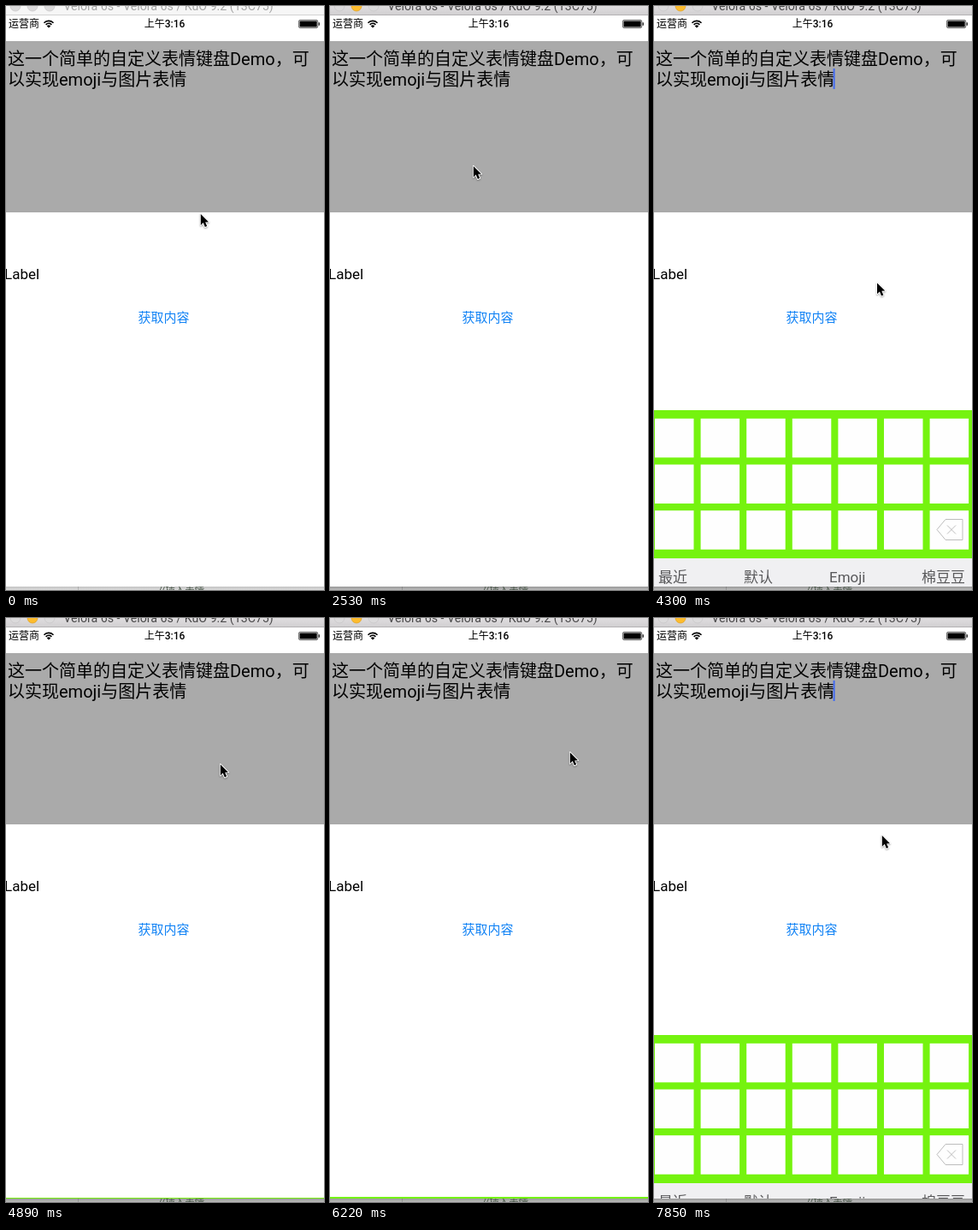
An HTML page with a canvas that plays this animation: 372 by 682 pixels, repeating every 8000 ms.

```html
<!DOCTYPE html>
<html lang="zh">
<head>
<meta charset="utf-8">
<title>自定义表情键盘</title>
<style>
html, body { margin: 0; width: 100%; height: 100%; overflow: hidden; background: #fff; }
canvas { display: block; width: 372px; height: 682px; }
</style>
</head>
<body>
<canvas id="stage"></canvas>
<script>
const W = 372, H = 682, LOOP = 8000, STEPS = 54, STEP = LOOP / STEPS;
const SCREEN_BOTTOM = 678, BOARD_H = 208, KEYS_H = 173;
const FONT = "Roboto, 'Noto Sans CJK SC', 'Noto Sans CJK', sans-serif";

const canvas = document.getElementById('stage');
const ctx = canvas.getContext('2d');
const dpr = window.devicePixelRatio || 1;
canvas.width = W * dpr;
canvas.height = H * dpr;
ctx.scale(dpr, dpr);

// Pointer stops as [ms, x, y]; each click toggles the keyboard.
const wander = [[0, 227, 242], [300, 203, 236], [1180, 186, 386], [1480, 200, 365], [2000, 168, 127], [2300, 167, 186]];
const clicks = [
  [2600, 167, 186], [3398, 280, 302], [3930, 250, 185], [4440, 261, 333], [5000, 250, 170],
  [5850, 254, 309], [6300, 280, 156], [6930, 275, 300], [7626, 266, 200]
];
const stops = [...wander, ...clicks, [7850, 266, 253]];
const ACTIVE_FROM = 2500;

const clamp = v => Math.min(1, Math.max(0, v));
const smooth = v => v * v * (3 - 2 * v);

// Between two stops the pointer rests, glides, then rests again.
function pointerAt(ms) {
  const next = stops.findIndex(s => s[0] > ms);
  if (next < 0) return stops[stops.length - 1].slice(1);
  const [t0, x0, y0] = stops[next - 1], [t1, x1, y1] = stops[next];
  const k = smooth(clamp(((ms - t0) / (t1 - t0) - 0.3) / 0.5));
  return [x0 + (x1 - x0) * k, y0 + (y1 - y0) * k];
}

// Critically damped spring, in whole pixels.
function keyboardAt(ms) {
  const past = clicks.filter(c => c[0] <= ms);
  const shown = past.length % 2 === 1;
  if (!past.length) return { shown, offset: BOARD_H };
  const s = 18.26 * (ms - past[past.length - 1][0]) / 1000;
  const rest = (1 + s) * Math.exp(-s);
  return { shown, offset: Math.round(BOARD_H * (shown ? rest : 1 - rest)) };
}

function rect(x, y, w, h, color) {
  ctx.fillStyle = color;
  ctx.fillRect(x, y, w, h);
}

function text(str, x, y, size, color, align = 'left', weight = 400) {
  ctx.font = `${weight} ${size}px ${FONT}`;
  ctx.textAlign = align;
  ctx.fillStyle = color;
  ctx.fillText(str, x, y);
}

function poly(points) {
  ctx.beginPath();
  points.forEach(([x, y]) => ctx.lineTo(x, y));
  ctx.closePath();
}

function shade(y0, y1, c0, c1) {
  const g = ctx.createLinearGradient(0, y0, 0, y1);
  g.addColorStop(0, c0);
  g.addColorStop(1, c1);
  return g;
}

function clipped(y, h, paint) {
  ctx.save();
  ctx.beginPath();
  ctx.rect(0, y, W, h);
  ctx.clip();
  paint();
  ctx.restore();
}

function drawTitleBar(active) {
  rect(0, 0, W, 10, active ? shade(0, 10, '#dfdddf', '#d2d0d2') : '#f6f6f6');
  rect(0, 10, W, 1, active ? '#b4b2b4' : '#d2d2d2');
  for (let i = 0; i < 3; i++) {
    const lit = active && i === 1;
    ctx.beginPath();
    ctx.arc(11 + i * 20, 0, 6, 0, Math.PI * 2);
    ctx.fillStyle = lit ? '#fdbc2e' : '#dbdadb';
    ctx.fill();
    ctx.lineWidth = 0.7;
    ctx.strokeStyle = lit ? '#dfa023' : '#c6c5c6';
    ctx.stroke();
  }
  text('Velora 6s - Velora 6s / KuO 9.2 (13C75)', 190, 4.6, 14.2, active ? '#4a494a' : '#a6a6a6', 'center');
}

function drawStatusBar() {
  text('运营商', 3, 25.4, 12, '#000');
  text('上午3:16', 185.6, 25.4, 12, '#000', 'center', 500);

  ctx.strokeStyle = '#000';
  ctx.lineWidth = 1.6;
  const from = -Math.PI * 0.76, to = -Math.PI * 0.24;
  for (const r of [4.6, 7.6]) {
    ctx.beginPath();
    ctx.arc(50, 25, r, from, to);
    ctx.stroke();
  }
  ctx.beginPath();
  ctx.moveTo(50, 25.5);
  ctx.arc(50, 25.5, 3, from, to);
  ctx.fill();

  ctx.lineWidth = 0.6;
  ctx.beginPath();
  ctx.roundRect(342.4, 16.4, 22.4, 9.2, 1.8);
  ctx.stroke();
  rect(343.5, 17.5, 20.2, 7, '#000');
  rect(365.6, 19.3, 1.2, 3.4, '#000');
}

function drawPage(caret) {
  rect(0, 41, W, 200, '#aaa');
  text('这一个简单的自定义表情键盘Demo，可', 2, 69, 20, '#000');
  text('以实现emoji与图片表情', 2, 92.6, 20, '#000');
  if (caret) rect(209.6, 73, 2, 24, '#426bf2');
  text('Label', -2, 319, 17, '#000');
  text('获取内容', 184.5, 368.6, 15, '#1283f5', 'center');
}

function drawDeleteKey(y) {
  ctx.strokeStyle = '#bdbdbd';
  ctx.lineWidth = 1;
  poly([[331, y], [341, y - 12], [361, y - 12], [361, y + 12], [341, y + 12]]);
  ctx.stroke();
  ctx.beginPath();
  for (const d of [-5, 5]) {
    ctx.moveTo(343, y - d);
    ctx.lineTo(353, y + d);
  }
  ctx.stroke();
}

function drawKeyboard(offset) {
  const top = SCREEN_BOTTOM - BOARD_H + offset;
  rect(0, top, W, KEYS_H, '#75f30f');
  for (let i = 0; i < 21; i++) {
    const col = i % 7, row = Math.floor(i / 7);
    rect(1 + col * 53.6, top + 9.8 + row * 53.7, 45.5, 45.5, '#fefefe');
  }
  drawDeleteKey(top + 139.5);
  rect(0, top + KEYS_H, W, BOARD_H - KEYS_H, '#f0f0f2');
  const y = top + 200.6;
  ['最近', '默认', 'Emoji'].forEach((tab, i) => text(tab, 5 + i * 100, y, 17, '#58585a'));
  text('棉豆豆', 364, y, 17, '#58585a', 'right');
}

function drawBackdrop(active) {
  const [near, far] = active ? ['#989898', '#bcbcbc'] : ['#c2c2c2', '#dcdcdc'];
  rect(0, SCREEN_BOTTOM, W, 4, shade(SCREEN_BOTTOM, H, near, far));
  rect(84, SCREEN_BOTTOM, 1, 4, 'rgba(0,0,0,.15)');
  text('//插入表情', 178, 686, 11.5, '#4d5a4d');
}

function drawPointer([x, y]) {
  ctx.save();
  ctx.translate(x + 0.8, y + 1);
  ctx.scale(0.92, 0.92);
  poly([[0, 0], [0, 14], [3.2, 11], [5.5, 16.4], [8, 15.3], [5.8, 10.2], [10, 10]]);
  ctx.lineJoin = 'round';
  ctx.lineWidth = 2;
  ctx.strokeStyle = '#fff';
  ctx.shadowColor = 'rgba(0,0,0,.35)';
  ctx.shadowBlur = 2 * dpr;
  ctx.shadowOffsetY = dpr;
  ctx.stroke();
  ctx.shadowColor = 'transparent';
  ctx.fillStyle = '#000';
  ctx.fill();
  ctx.restore();
}

function draw(now) {
  // The picture is held between evenly spaced steps.
  const ms = Math.min(STEPS - 1, Math.floor((now % LOOP + 5) / STEP)) * STEP;
  const active = ms >= ACTIVE_FROM;
  const board = keyboardAt(ms);

  rect(0, 0, W, H, '#fff');
  drawTitleBar(active);
  drawStatusBar();
  drawPage(board.shown);
  clipped(0, SCREEN_BOTTOM, () => drawKeyboard(board.offset));
  clipped(SCREEN_BOTTOM, H - SCREEN_BOTTOM, () => drawBackdrop(active));
  drawPointer(pointerAt(ms));
}

const start = performance.now();
function tick() {
  draw(performance.now() - start);
  requestAnimationFrame(tick);
}
tick();
</script>
</body>
</html>
```
